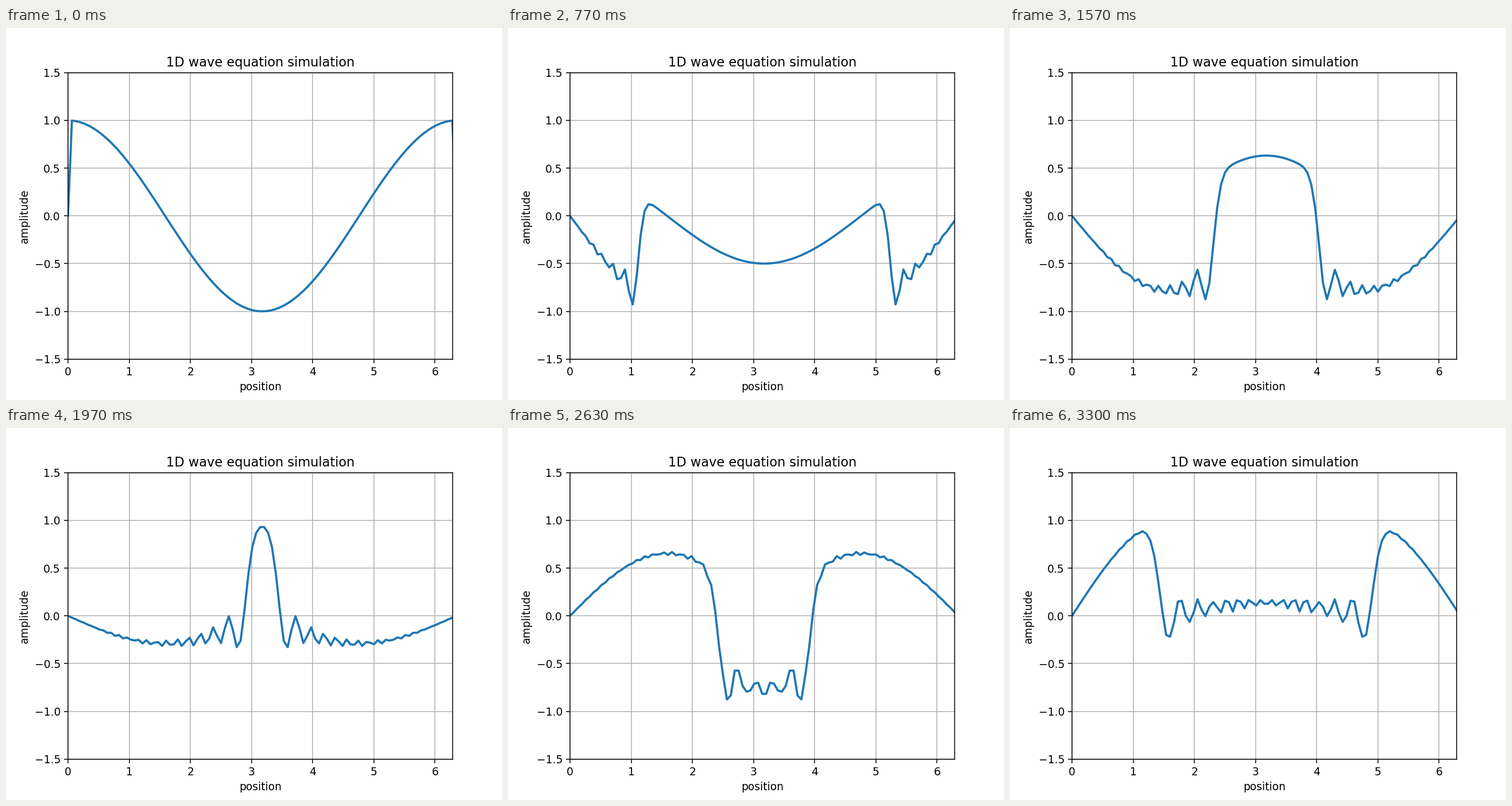
A matplotlib script that plays this animation: 864 by 648 pixels, repeating every 3.33 s.

```python
import numpy as np
import matplotlib.pyplot as plt
from matplotlib.animation import FuncAnimation

POINTS = 100
FRAMES = 100
LOOP_MS = 3330
LENGTH = 2 * np.pi
DT = 0.05
DX = LENGTH / (POINTS - 1)
COURANT2 = (DT / DX) ** 2


def curvature(u):
    """Second difference, zero at the fixed ends."""
    out = np.zeros_like(u)
    out[1:-1] = u[2:] - 2 * u[1:-1] + u[:-2]
    return out


def simulate():
    """Leapfrog solution of the wave equation, one row per time step."""
    start = np.cos(np.linspace(0, LENGTH, POINTS))
    start[[0, -1]] = 0
    velocity = 0.1 * start
    rows = [start, start + DT * velocity + 0.5 * COURANT2 * curvature(start)]
    while len(rows) < FRAMES:
        rows.append(2 * rows[-1] - rows[-2] + COURANT2 * curvature(rows[-1]))
    return rows


waves = simulate()
# The last node lies one cell past the visible range.
x = np.arange(POINTS) * LENGTH / (POINTS - 2)

plt.rcParams["font.family"] = "DejaVu Sans"
fig, ax = plt.subplots(figsize=(6.4, 4.8), dpi=135)
line, = ax.plot(x, waves[0], color="#1f77b4", lw=2)
ax.set_xlim(0, LENGTH)
ax.set_ylim(-1.5, 1.5)
ax.set_title("1D wave equation simulation")
ax.set_xlabel("position")
ax.set_ylabel("amplitude")
ax.grid(True)


def update(step):
    line.set_ydata(waves[step])
    return line,


anim = FuncAnimation(fig, update, frames=FRAMES, interval=LOOP_MS / FRAMES,
                     repeat=True, repeat_delay=0)
plt.show()
```
